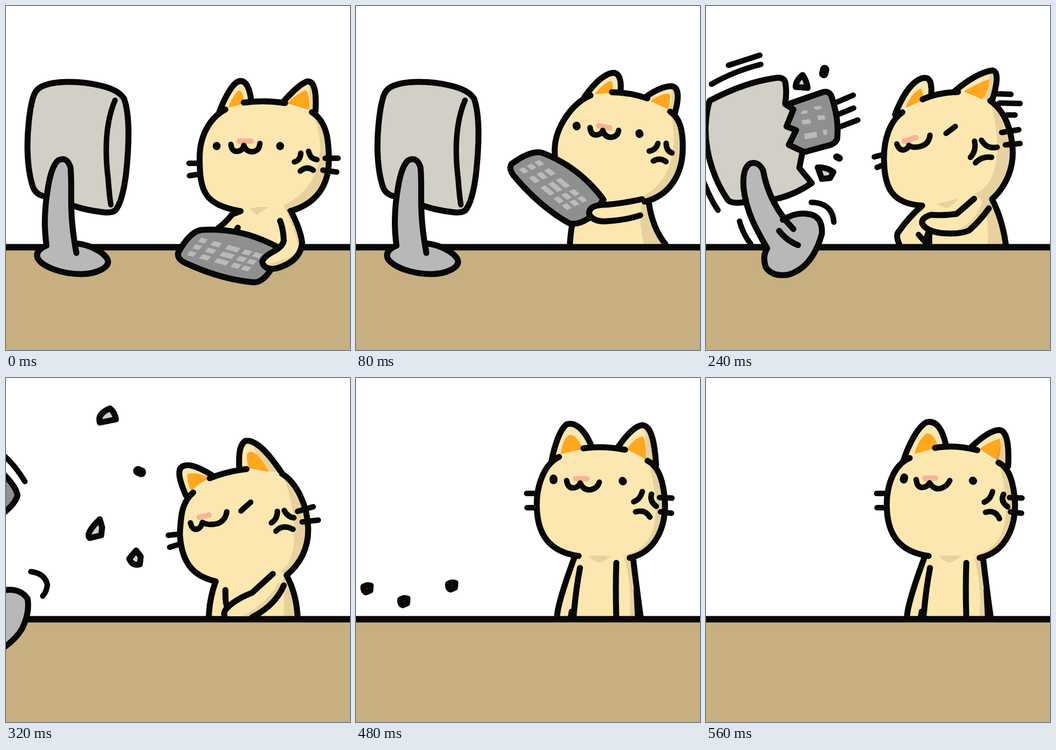
Animation of 748x748 px, one loop 640 ms. Source, as an HTML page:

```html
<!DOCTYPE html>
<html lang="en">
<head>
<meta charset="utf-8">
<title>Angry cat</title>
<style>
  html, body { margin: 0; width: 100%; height: 100%; overflow: hidden; background: #fff; }
  svg { display: block; width: 100vw; height: 100vh; }
  path { stroke-linecap: round; stroke-linejoin: round; }
</style>
</head>
<body>
<svg id="stage" viewBox="0 0 748 748"></svg>
<script>
const STEP = 80;
const INK = '#080806', SKIN = '#fde7b1', ORANGE = '#ffa71f', PINK = '#f8b39a';
const SCREEN = '#d1cfc6', STAND = '#b8b8b8', BOARD = '#8f8f8f', KEY = '#bababa';

const path = (d, fill, stroke = 'none', width = 13) =>
  `<path d="${d}" fill="${fill}" stroke="${stroke}" stroke-width="${width}"/>`;
const flat = (d, color) => path(d, color);
const line = (d, width = 13, color = INK) => path(d, 'none', color, width);
const blob = (d, color) => path(d, color, INK);
const shade = d => `<path d="${d}" fill="#210" opacity=".1"/>`;
const dot = (x, y) => line(`M${x - 4} ${y - 1}l7 3`, 21);
const chunk = (x, y, w = 11, h = 10) =>
  blob(`M${x - w} ${y - h * .5}Q${x} ${y - h * 1.2} ${x + w} ${y - h * .8}L${x + w * .9} ${y + h * .5}L${x - w * .3} ${y + h}Q${x - w} ${y + h * .8} ${x - w} ${y - h * .5}Z`, SCREEN);

// Averages two paths, or two whole poses, of the same structure.
const mixPath = (a, b) => {
  const other = b.match(/-?[\d.]+/g);
  let i = 0;
  return a.replace(/-?[\d.]+/g, n => (+n + +other[i++]) / 2);
};
const mixPose = (a, b) =>
  Object.fromEntries(Object.keys(a).map(k => [k, mixPath(a[k], b[k])]));

const sitting = {
  earL: 'M464 230C474 203 488 177 500 167C515 156 529 168 533 206',
  earR: 'M604 207C622 187 640 169 655 164C673 162 675 195 673 230',
  innerL: 'M483 221Q497 187 507 184Q516 186 518 212Z',
  innerR: 'M611 212Q635 188 652 183Q662 195 658 226Z',
  earShade: 'M656 168Q664 190 656 224L674 230Q676 165 656 168Z',
  left: 'M477 225C441 244 421 285 421 330C421 405 432 432 510 446',
  right: 'M618 446C675 430 702 390 702 335C702 290 697 250 665 231',
  top: 'M607 211Q562 204 517 210',
  fold: 'C695 290 695 390 603 434Z',
  eyes: 'M458 304l0 1M596 304l0 1',
  nose: 'M507 294L533 294',
  mouth: 'M489 301Q491 317 503 316Q516 314 517 303Q522 317 536 317Q551 315 552 299',
  anger: 'M641 320Q640 336 627 339M658 316Q661 332 676 334M640 359Q654 347 668 357',
  whiskers: 'M398 342L418 342M399 369L418 366M694 331L722 331M689 357L719 361'
};
const windUp = {
  earL: 'M530 165C555 143 580 129 603 127C622 125 626 138 618 160',
  earR: 'M658 187C680 178 705 178 720 185C736 194 727 220 713 238',
  innerL: 'M555 163Q580 145 603 142Q605 155 594 166Z',
  innerR: 'M669 201Q690 193 710 198Q711 212 698 224Z',
  earShade: 'M716 200Q715 218 702 228L713 238Q728 212 726 196Z',
  left: 'M543 164C500 178 446 240 443 292C443 315 452 332 466 348',
  right: 'M637 405C690 395 718 340 719 285C720 260 716 240 701 228',
  top: 'M660 191Q632 172 596 165',
  fold: 'C704 290 697 375 630 400Z',
  eyes: 'M501 216l1 3M636 249l1 3',
  nose: 'M548 228L570 236',
  mouth: 'M529 228Q529 243 541 245Q552 244 556 238Q560 255 575 254Q588 252 590 242',
  anger: 'M672 278Q664 291 648 292M691 281Q688 298 698 305M653 315Q668 310 680 320',
  whiskers: ''
};
const thrown = {
  earL: 'M411 236C425 200 445 165 470 157C487 153 491 165 490 192',
  earR: 'M541 185C570 160 600 143 623 140C638 143 632 175 622 206',
  innerL: 'M434 222Q445 190 467 179Q474 190 472 205Z',
  innerR: 'M560 186Q590 168 616 159Q617 180 601 203Z',
  earShade: 'M616 148Q618 180 602 203L622 206Q634 170 628 146Z',
  left: 'M427 231C400 250 386 290 387 335C388 395 404 430 470 434',
  right: 'M622 420C655 390 668 350 667 315C665 270 650 228 618 206',
  top: 'M548 187Q505 188 471 203',
  fold: 'C640 280 645 390 583 408Z',
  wink: 'M522 277L542 262',
  nose: 'M431 294L456 286',
  mouth: 'M415 300Q420 314 430 313Q440 310 441 303Q450 310 467 305Q485 300 487 281',
  anger: 'M584 294Q588 315 575 329M599 292Q611 312 633 307M586 341Q600 326 621 329',
  whiskers: 'M366 328L382 324M372 351L384 346M643 275L680 269M651 302L683 299'
};
const followThrough = {
  earL: 'M391 255C378 225 373 205 380 195C395 180 430 200 452 214',
  earR: 'M507 194C506 165 508 145 520 137C545 132 575 170 600 207',
  innerL: 'M394 209Q420 203 442 219Q415 230 403 247Q393 225 394 209Z',
  innerR: 'M524 164Q535 155 550 170Q565 188 571 204L529 197Q522 180 524 164Z',
  earShade: 'M535 142Q570 165 600 207L571 204Q560 175 545 165Z',
  left: 'M407 249C382 270 380 300 378 340C382 405 410 432 456 442',
  right: 'M610 429C650 395 658 355 657 325C655 280 635 230 600 208',
  top: 'M523 198Q480 203 443 218',
  fold: 'C635 285 638 400 597 420Z',
  wink: 'M511 289L532 270',
  nose: 'M420 303L441 298',
  mouth: 'M401 315Q405 330 414 329Q424 327 427 314Q440 322 462 316Q478 308 480 291',
  anger: 'M590 290Q590 307 577 315M605 288Q612 302 626 304M587 333Q602 317 624 329',
  whiskers: 'M353 342L372 340M356 368L375 362M634 290L668 280M644 313L679 309'
};
const upright = {
  earL: 'M422 180C422 150 425 120 435 106C455 96 485 120 502 150',
  earR: 'M563 150C578 118 595 93 609 92C630 95 640 135 648 185',
  innerL: 'M437 166Q436 135 446 127Q465 125 481 158Z',
  innerR: 'M582 156Q592 125 608 121Q620 125 626 172Z',
  earShade: 'M610 95Q625 130 627 172L648 184Q640 100 610 95Z',
  left: 'M440 169C405 190 393 240 393 275C393 340 420 378 484 387',
  right: 'M595 391C655 378 672 320 672 275C670 230 660 190 632 176',
  top: 'M580 155Q535 150 491 154',
  fold: 'C656 250 675 370 580 385Z',
  eyes: 'M428 221l1 3M579 224l1 2',
  nose: 'M479 220L504 220',
  mouth: 'M459 225Q462 240 474 240Q486 239 489 229Q494 246 509 246Q525 245 528 230',
  anger: 'M622 247Q617 264 603 268M638 252Q637 268 650 278M608 290Q628 284 640 299',
  whiskers: 'M371 251L392 251M372 282L392 282M660 260L687 261M662 291L686 294'
};
const calm = {
  ...upright,
  earL: 'M428 183C442 140 462 105 480 96C503 91 515 115 522 147',
  earR: 'M577 150C598 130 620 114 637 113C656 114 659 150 657 192',
  innerL: 'M453 165Q463 132 479 121Q495 117 505 151Z',
  innerR: 'M595 154Q618 137 639 132Q644 155 634 180Z',
  earShade: 'M641 116Q643 150 631 178L656 194Q660 115 641 116Z',
  left: 'M443 174C405 190 393 240 393 275C393 340 420 378 484 387',
  right: 'M595 391C655 378 672 320 672 275C670 230 660 195 636 184',
  top: 'M590 157Q540 144 498 152',
  eyes: 'M431 216l-1 5M580 223l1 1',
  nose: 'M476 218L499 218',
  mouth: 'M457 221Q459 238 470 238Q482 237 486 228Q496 244 511 240Q525 235 530 223',
  anger: 'M623 247Q619 264 605 270M647 253Q639 268 656 280M608 292Q630 286 638 306'
};

function head(p) {
  const face = (p.left + p.right + p.top).replace(/(?!^)M/g, 'L');
  return blob(p.earL, SKIN) + blob(p.earR, SKIN) + flat(face, SKIN)
    + flat(p.innerL, ORANGE) + flat(p.innerR, ORANGE)
    + shade(p.earShade) + shade(p.right + p.fold)
    + line(p.left) + line(p.right) + line(p.top)
    + line(p.nose, 12, PINK) + line(p.mouth, 12) + line(p.anger, 12) + line(p.whiskers, 12)
    + (p.eyes ? line(p.eyes, 17) : line(p.wink, 12));
}

const desk = flat('M0 524H748V748H0Z', '#c8af81') + line('M-9 524.5H757', 14);

const monitor =
  blob('M78 175C105 162 160 162 205 173Q245 182 257 202C270 240 268 300 261 365C256 405 248 432 238 444Q230 451 208 448Q175 444 148 435L84 414Q64 410 58 392C45 350 43 290 53 225C58 197 62 182 78 175Z', SCREEN)
  + line('M237 205C218 250 214 310 222 375Q225 415 228 432', 12)
  + blob('M153 537C147 505 143 475 142 440C141 400 143 372 140 350Q132 326 113 336C98 350 92 385 87 425C83 465 84 490 88 521Q62 532 69 549C80 567 120 583 165 583C200 582 222 568 222 556C221 540 185 519 152 516', STAND);

const keyColumns = [[0, 14], [29, 18], [65, 26], [96, 16], [118, 15]];
const keys = [0, 16, 32].map(v => keyColumns.map(([u, w]) =>
  `M${u - w / 2} ${v - 5}h${w}v10h${-w}z`).join('')).join('');
const keyboard =
  blob('M425 487Q400 490 374 537Q372 552 395 561Q470 595 540 601Q560 600 578 570L588 523Q510 481 425 487Z', BOARD)
  + `<g transform="matrix(1 .27 -.75 .9 428 510)">${flat(keys, KEY)}</g>`;

const brokenMonitor =
  blob('M180 213L255 187Q270 184 274 200Q290 250 285 290Q280 301 260 305L205 320L170 300Z', BOARD)
  + flat('M205 235l7-9l9 2v5zM233 219l16-2l3 6l-13 3zM208 248l18-2l3 9l-18 3zM242 239l15-2l3 9l-16 3zM214 278l26-5l2 12l-27 5zM253 270l10-2v11l-7 2z', KEY)
  + blob('M8 206Q85 165 155 156Q172 155 173 170Q176 190 172 213L190 225L175 262L196 270L180 302L210 316L203 352L230 385Q190 412 150 420L70 428Q52 428 47 421C22 385 0 330 -1 270Q0 230 8 206Z', SCREEN)
  + blob('M190 485Q137 430 124 357Q113 336 95 343Q78 355 82 398C88 450 112 490 133 527Q122 545 130 568Q145 590 180 584Q232 568 252 495Q254 455 220 452Q195 448 167 465', STAND)
  + line('M159 489Q175 510 200 520')
  + line('M280 211L320 194M287 236L321 222M293 262L330 248M49 129L117 107M12 170Q60 142 119 127M229 427Q275 428 278 470M73 468Q80 495 97 517M-4 385Q10 420 26 444', 12)
  + blob('M210 150Q195 162 195 176L221 178Q218 160 210 150Z', SCREEN)
  + blob('M243 351Q262 350 277 361L270 374L252 376Z', SCREEN)
  + line('M258 138L256 147', 20) + line('M284 328L290 331', 15);

const flyingMonitor =
  blob('M-10 205Q22 235 25 255Q20 275 -10 297Z', BOARD)
  + blob('M-8 462Q30 455 47 480Q52 510 35 545Q20 570 -8 588Z', STAND)
  + line('M-5 168Q20 190 41 225M54 421Q85 425 90 450Q88 465 80 474', 12)
  + blob('M226 66Q237 75 239 90L204 97Q198 78 226 66Z', SCREEN)
  + blob('M204 307L209 325L207 342L182 348Q172 338 204 307Z', SCREEN)
  + blob('M283 375L293 388L291 405Q275 410 268 393Z', SCREEN)
  + dot(291, 203);

const explosion =
  blob('M-9 275L18 267L12 298L38 307L26 330L52 353L30 375L42 400L15 412L12 446L-9 437Z', '#f1dc78')
  + chunk(7, 156) + chunk(37, 230) + chunk(175, 216) + chunk(89, 371, 16)
  + chunk(240, 386, 13) + chunk(130, 433, 9) + line('M272 304L278 304', 15);

const chinShade = shade('M506 387Q530 385 556 387Q540 398 530 402Q516 398 506 387Z');

const liftBody =
  flat('M466 348Q475 390 488 415Q468 460 465 520H674Q645 470 635 400Z', SKIN)
  + shade('M618 425L636 408C637 450 650 490 673 520H627Q614 470 618 425Z')
  + line('M464 350Q475 390 488 415Q468 460 465 520M635 408C637 450 650 490 673 518');

const steps = [
  {
    pose: sitting,
    body: flat('M508 440L492 453Q475 474 455 488L470 520H640V480L618 440Z', SKIN)
      + line('M510 446L492 453Q475 474 455 488'),
    front: shade('M528 441Q550 436 572 437L545 454Z') + line('M504 482L498 492')
      + keyboard
      + flat('M620 447Q640 485 644 515Q640 555 590 570Q562 576 557 556Q560 545 585 532Q602 522 604 510Q603 485 596 467L604 446Z', SKIN)
      + shade('M603 434L620 447Q640 485 644 515Q640 555 590 570Q570 574 562 562Q620 552 636 530Q632 490 603 434Z')
      + line('M620 447Q640 485 644 515Q640 555 590 570Q562 576 557 556Q560 545 585 532Q602 522 604 510Q603 485 596 467')
      + monitor
  },
  {
    pose: mixPose(windUp, sitting),
    body: liftBody,
    front: `<g transform="translate(-60 -110) rotate(25 575 550)">${keyboard}</g>`
      + blob('M622 420Q575 430 545 432Q505 432 507 452Q515 470 545 468Q590 465 618 455', SKIN)
      + monitor
  },
  {
    pose: windUp,
    body: blob('M487 186Q465 174 448 173Q435 178 420 205Q402 232 404 238Q415 260 443 276', BOARD)
      + line('M447 194L472 202M440 208L464 216M432 221L456 230M424 236L442 249', 8, KEY) + liftBody,
    front: flat('M620 403C600 390 580 385 563 378C545 362 520 335 500 328Q478 325 478 345C480 370 510 410 540 425C565 438 590 443 615 444Z', SKIN)
      + shade('M482 350C488 378 525 420 560 432L570 428Q520 400 482 350Z')
      + line('M620 403C600 390 580 385 563 378C545 362 520 335 500 328Q478 325 478 345C480 370 510 410 540 425C565 438 590 443 615 444')
      + monitor
  },
  {
    pose: thrown,
    body: line('M634 191L663 192M638 211L683 212M655 237L672 237', 12)
      + flat('M470 428Q440 460 418 492Q412 500 421 520H652Q645 465 622 414Z', SKIN)
      + shade('M622 420Q645 465 652 520H612Q615 480 608 440Z')
      + line('M470 434Q440 460 418 492Q412 500 421 520M622 420Q645 465 652 520')
      + line('M462 497L476 513L484 490M486 496V518', 12),
    front: shade('M500 431L551 418L526 440Z')
      + flat('M583 419L545 452Q515 456 490 454Q468 460 470 473Q480 491 515 494Q553 497 572 488Q595 468 615 440L600 412Z', SKIN)
      + shade('M583 408L622 420L615 440Q595 468 572 488L540 493Q590 465 600 425Z')
      + line('M583 419L545 452Q515 456 490 454Q468 460 470 473Q480 491 515 494Q553 497 572 488Q595 468 615 440')
      + brokenMonitor
  },
  {
    pose: followThrough,
    body: flat('M456 436Q442 480 441 520H634Q632 470 610 423Z', SKIN)
      + shade('M610 429Q632 470 634 520H603Q607 480 600 440Z')
      + line('M456 442Q442 480 441 520M610 429Q632 470 634 520M477 461Q477 490 480 495'),
    front: flat('M580 426L535 467Q495 483 478 503Q472 512 476 518H535Q585 495 604 451Z', SKIN)
      + shade('M592 444Q570 490 512 518H535Q585 495 604 451Z')
      + line('M580 426L535 467Q495 483 478 503Q472 512 476 520M604 451Q585 495 535 520')
      + flyingMonitor
  },
  {
    pose: upright,
    body: flat('M475 380V390Q455 440 428 485Q420 500 421 520H620Q612 455 600 380Z', SKIN)
      + shade('M583 390L600 395L607 460Q600 520 590 520H573Q590 470 583 390Z')
      + line('M475 390Q455 440 428 485Q420 500 421 520M601 395Q612 455 620 520M487 413Q478 460 473 520M564 407Q562 430 556 460Q530 500 537 520M609 470Q606 505 593 520'),
    front: chinShade + explosion
  },
  {
    pose: mixPose(upright, calm),
    front: chinShade + chunk(24, 458, 8, 8) + chunk(208, 452, 8, 8) + chunk(104, 486, 8, 8)
  },
  {
    pose: calm,
    body: flat('M475 380V390Q438 490 437 520H620Q612 455 600 380Z', SKIN)
      + shade('M583 390L600 395L607 520H595Q600 450 583 390Z')
      + line('M475 390Q438 490 437 520M603 396Q610 455 619 520M610 460L613 520M487 413Q478 460 473 520M469 508L467 520M566 402Q564 460 566 520'),
    front: chinShade
  }
];
steps[6].body = steps[7].body;

const stage = document.getElementById('stage');
stage.innerHTML = steps.map(s =>
  `<g visibility="hidden">${s.body}${head(s.pose)}${desk}${s.front}</g>`).join('');
const scenes = [...stage.children];

function render() {
  const current = Math.floor(performance.now() / STEP) % scenes.length;
  scenes.forEach((scene, i) => scene.setAttribute('visibility', i === current ? 'visible' : 'hidden'));
  requestAnimationFrame(render);
}
render();
</script>
</body>
</html>
```
